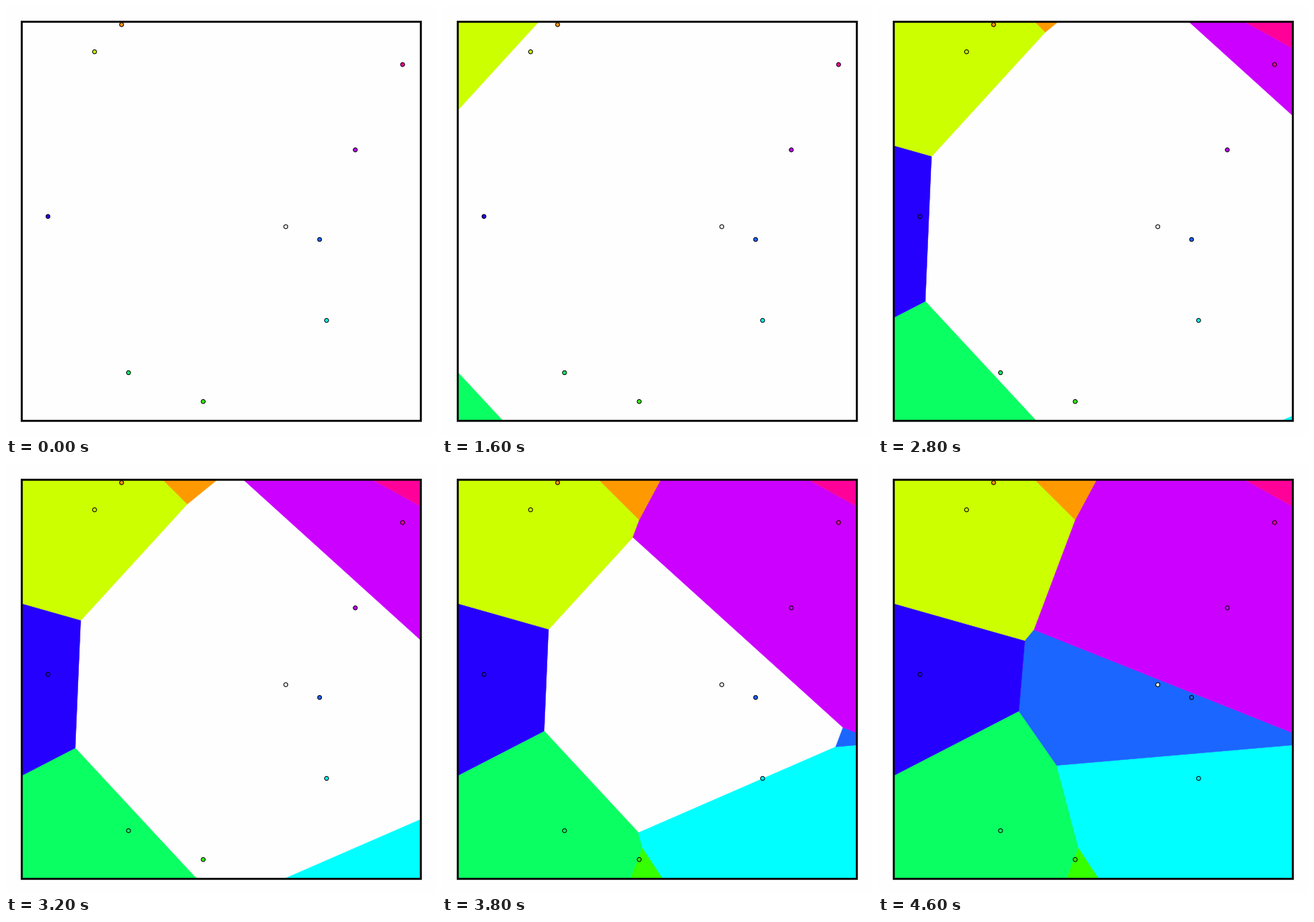
Recreate the animation shown at these times as a matplotlib script. Size 584x584 px, loop 5000 ms.

```python
import numpy as np
import matplotlib.pyplot as plt
from matplotlib.animation import FuncAnimation
from matplotlib.patches import Circle, Polygon, Rectangle

SIZE, DPI = 584, 100
PX = 72 / DPI              # points per pixel
LOW, HIGH = 21.4, 563.4    # inner square
FRAMES, STEP_MS = 25, 200
PAPER = "#fefefe"

# Each site: x, y, offset of its cell, colour
CENTRE = np.array([380.0, 299.7])
SITES = [
    (157.0, 25.3, 7005, "#ff9900"),
    (120.3, 62.2, 0, "#ccff00"),
    (267.8, 537.2, 181260, "#35ff00"),
    (166.4, 498.0, 133245, "#0aff62"),
    (435.4, 427.0, 169490, "#00ffff"),
    (425.9, 317.1, 122190, "#1a66ff"),
    (57.0, 285.8, 41120, "#2600ff"),
    (474.4, 195.4, 105060, "#cc00ff"),
    (538.6, 79.5, 134555, "#ff0099"),
]
normals = np.array([s[:2] for s in SITES]) - CENTRE
offsets = np.array([s[2] for s in SITES], float)
SQUARE = [np.array(p) for p in
          ((LOW, LOW), (HIGH, LOW), (HIGH, HIGH), (LOW, HIGH))]


def clip(points, normal, offset):
    """Keep the part of a convex polygon where normal . p >= offset."""
    kept = []
    for a, b in zip(points, points[1:] + points[:1]):
        da, db = normal @ a - offset, normal @ b - offset
        if da >= 0:
            kept.append(a)
        if da * db < 0:
            kept.append(a + (b - a) * da / (da - db))
    return kept


def power_cell(i):
    """Full cell of site i, ignoring the central site."""
    points = SQUARE
    for j in range(len(SITES)):
        if j != i:
            points = clip(points, normals[i] - normals[j],
                          offsets[i] - offsets[j])
    return points


def central_level(step):
    """The central site loses weight at a constant rate."""
    return -1511 - 4708 * step


fig = plt.figure(figsize=(SIZE / DPI, SIZE / DPI), dpi=DPI, facecolor=PAPER)
ax = fig.add_axes([0, 0, 1, 1])
ax.set_xlim(0, SIZE)
ax.set_ylim(SIZE, 0)
ax.axis("off")

full_cells = [power_cell(i) for i in range(len(SITES))]
patches = []
for *_, colour in SITES:
    # A hairline in the fill colour closes the seams between cells
    patch = Polygon(SQUARE, facecolor=colour, edgecolor=colour, lw=0.5 * PX,
                    joinstyle="round", snap=False, visible=False, zorder=1)
    patches.append(ax.add_patch(patch))

ax.add_patch(Rectangle((LOW, LOW), HIGH - LOW, HIGH - LOW, fill=False,
                       edgecolor="black", lw=2.7 * PX, snap=False, zorder=2))
for x, y, colour in [(*CENTRE, PAPER)] + [(s[0], s[1], s[3]) for s in SITES]:
    ax.add_patch(Circle((x, y), 2.7, facecolor=colour, edgecolor="black",
                        lw=1.0 * PX, zorder=3))


def update(step):
    level = central_level(step)
    for i, patch in enumerate(patches):
        points = clip(full_cells[i], normals[i], offsets[i] + level)
        patch.set_visible(len(points) > 2)
        if len(points) > 2:
            patch.set_xy(points)
    return patches


anim = FuncAnimation(fig, update, frames=FRAMES, interval=STEP_MS,
                     init_func=lambda: update(0), repeat=True,
                     repeat_delay=0, blit=False)
plt.show()
```
